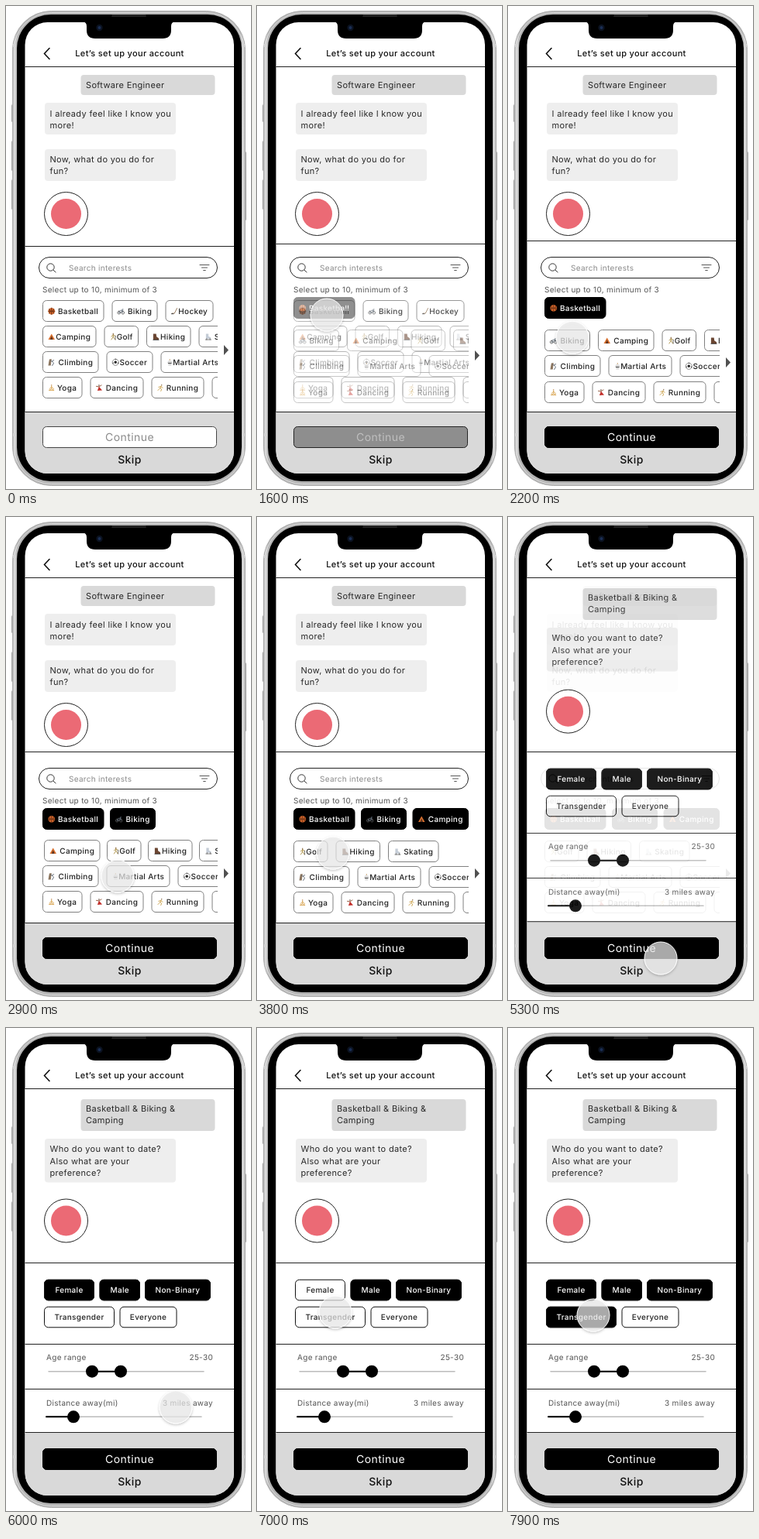
An HTML page that plays this animation: 316x624 px, repeating every 8000 ms.

```html
<!DOCTYPE html>
<html lang="en">
<head>
<meta charset="utf-8">
<title>Account setup</title>
<style>
html, body { margin: 0; width: 100%; height: 100%; overflow: hidden; background: #fff; }
svg { display: block; width: 316px; height: 624px; }
text {
  font-family: Inter, "Open Sans", sans-serif; letter-spacing: .03em;
  white-space: pre; text-rendering: geometricPrecision;
}
</style>
</head>
<body>
<svg id="stage" viewBox="0 0 316 624" xmlns="http://www.w3.org/2000/svg">
  <defs>
    <clipPath id="screen"><rect x="24.5" y="21" width="269.5" height="583" rx="29"/></clipPath>
    <clipPath id="list"><rect x="40" y="372" width="233" height="150"/></clipPath>
    <linearGradient id="metal">
      <stop offset="0" stop-color="#a8a8a8"/><stop offset=".008" stop-color="#dedede"/>
      <stop offset=".02" stop-color="#b4b4b4"/><stop offset=".98" stop-color="#b4b4b4"/>
      <stop offset=".992" stop-color="#dedede"/><stop offset="1" stop-color="#a8a8a8"/>
    </linearGradient>
    <filter id="soft" x="-30%" y="-30%" width="160%" height="160%">
      <feDropShadow dx="0" dy="1.5" stdDeviation="1.8" flood-opacity=".28"/>
    </filter>
  </defs>
  <g id="phone"></g>
  <g clip-path="url(#screen)">
    <rect x="24" y="21" width="270" height="583" fill="#fff"/>
    <g id="chat"></g>
    <g id="search"></g>
    <g id="lists" clip-path="url(#list)"></g>
    <path id="arrow" d="M281 -6.5L287 0L281 6.5Z" fill="#505050"/>
    <g id="dating"></g>
    <path id="divider" d="M24 0H294" stroke="#222"/>
    <g id="avatar"></g>
    <g id="header"></g>
    <g id="footer"></g>
    <g id="cursor"></g>
  </g>
  <g id="notch"></g>
</svg>
<script>
const $ = id => document.getElementById(id);

function el(parent, tag, attrs = {}, content) {
  const node = document.createElementNS('http://www.w3.org/2000/svg', tag);
  for (const key in attrs) node.setAttribute(key, attrs[key]);
  if (content !== undefined) node.textContent = content;
  parent.appendChild(node);
  return node;
}
const group = parent => el(parent, 'g');
const box = (p, x, y, width, height, rx, fill, stroke = 'none') =>
  el(p, 'rect', { x, y, width, height, rx, fill, stroke });
const line = (p, d, stroke = '#222', width = 1) =>
  el(p, 'path', { d, stroke, fill: 'none', 'stroke-width': width, 'stroke-linecap': 'round' });
const dot = (p, cx, cy, r, fill, stroke = 'none') => el(p, 'circle', { cx, cy, r, fill, stroke });
const text = (p, x, y, str, size, fill = '#222', anchor = 'start', weight = 400) =>
  el(p, 'text', { x, y, fill, 'font-size': size, 'text-anchor': anchor, 'font-weight': weight }, str);

// Phone body
const phone = $('phone');
[[7, 127, 23], [7, 174, 39], [7, 224, 39], [306, 188, 89]].forEach(([x, y, h]) =>
  box(phone, x, y, 4, h, 1.5, '#a4a4a4'));
box(phone, 8.5, 6.5, 300, 613, 50, 'url(#metal)', '#b0b0b0');
box(phone, 10.5, 8.5, 296, 609, 48, 'none', '#dcdcdc');
[49, 552].forEach(y => [9, 304].forEach(x => box(phone, x, y, 4, 4, 0, '#d4d4d4')));
box(phone, 14, 11, 290, 603, 44, '#000');

const notch = $('notch');
el(notch, 'path', { d: 'M99 20Q104 21 104 26V31Q104 42 115 42H202Q213 42 213 31V26Q213 21 218 20Z' });
dot(notch, 120.5, 28, 4.2, '#0b1220');
dot(notch, 120.5, 28, 2, '#1b2f55');
box(notch, 136, 11, 45, 3, 1.5, '#222');

// Header and conversation
const header = $('header');
line(header, 'M56 54.5L49.5 61.5L56 68.5', '#111', 1.6);
text(header, 159.5, 65, 'Let’s set up your account', 11, '#111', 'middle', 500);
line(header, 'M24 78.5H294');

function bubble(p, x, y, w, h, fill, first, lines) {
  box(p, x, y, w, h, 4, fill);
  lines.forEach((str, i) => text(p, x + 6.5, first + i * 15.4, str, 11, '#292929'));
}
const chat = $('chat');
bubble(chat, 96.5, 89, 173, 26, '#d9d9d9', 106, ['Software Engineer']);
bubble(chat, 50, 125, 169, 41, '#eee', 142.5, ['I already feel like I know you', 'more!']);
bubble(chat, 50, 185, 169, 41, '#eee', 202, ['Now, what do you do for', 'fun?']);
dot($('avatar'), 77.5, 0, 28, '#fff', '#222');
dot($('avatar'), 77.5, 0, 19.5, '#eb6a75');

// Search field
const search = $('search');
box(search, 42.5, 324.5, 230, 27, 13.5, '#fff', '#222');
dot(search, 57.5, 337.5, 4.7, 'none', '#333');
line(search, 'M61 341L64 344', '#333');
text(search, 81, 342, 'Search interests', 10, '#8a8a8a');
line(search, 'M250 334.5H262M252.5 338H259.5M254.7 341.5H257.3', '#555');
text(search, 47, 369.5, 'Select up to 10, minimum of 3', 10, '#555');

// Pictograms: [path, colour, filled] on a 10 unit square
const figure = 'M5 1.5V5L2.5 9M5 5L7.5 9M2.5 4.5L5 3L8 4';
const icons = {
  Basketball: [['M5 .5A4.5 4.5 0 1 0 5.01 .5Z', '#d9682b', 1], ['M5 .5V9.5M.5 5H9.5M2 2Q4.5 5 2 8M8 2Q5.5 5 8 8', '#5a2a12']],
  Biking: [['M2.3 5A2 2 0 1 0 2.31 5ZM7.7 5A2 2 0 1 0 7.71 5Z', '#555'], ['M2.3 7L4 4H7L5 7H2.3M7.7 7L6.6 2.5H8', '#66707c']],
  Hockey: [['M8.5 1L5 8H2', '#8a6a4a'], ['M1 8.6H3.5', '#222']],
  Camping: [['M5 1L9.5 9H.5Z', '#d9712f', 1], ['M5 4L7 9H3Z', '#5d3420', 1]],
  Golf: [[figure, '#a88b3a'], ['M5 .6V2', '#754c24'], ['M8 4V9', '#555']],
  Hiking: [['M2 1H6L6.5 5L9.5 7V9H2Z', '#6b4632', 1], ['M2 9.3H9.5', '#222']],
  Skating: [['M2.5 1H6V4.5L9 6V7.5H2.5Z', '#c4ccd6', 1], ['M2 9H9.5M3.5 7.5V9M8 7.5V9', '#666']],
  Climbing: [['M.5 9.5L2 1L5 .5L4 9.5Z', '#8c765f', 1], ['M8 2L6 4L8 6L6 9.5M6 4L4 3', '#4a5563']],
  Soccer: [['M5 .7A4.3 4.3 0 1 0 5.01 .7Z', '#777'], ['M5 3L7 4.5L6.2 6.7H3.8L3 4.5ZM4 1H6L5 1.8ZM1 6L2.2 7.5L2 4.8ZM9 6L7.8 7.5L8 4.8Z', '#222', 1]],
  'Martial Arts': [['M3 3H7L8.5 6H7V9.5H3V6H1.5Z', '#d9d9d9', 1], ['M3 6.3H7', '#333'], ['M5 1V2', '#b98a4b']],
  Yoga: [['M5 3V6.5L1.5 8.5H8.5L5 6.5M5 3.8L2 6.5M5 3.8L8 6.5', '#d8a24a'], ['M5 1V2', '#b9772f']],
  Dancing: [['M4.5 3L6 5L9 8.5L2.5 9L4 5Z', '#c22f2a', 1], ['M1 3L4.5 3.5L8 1.5', '#8a4b2c'], ['M4.7 1V2.2', '#4b2a1a']],
  Running: [['M6 2.5L4.5 5.5L6.5 7L5.5 9.5M4.5 5.5L1.5 8.5M2.5 4L5.5 3.2L8 5', '#c79a3e'], ['M6.6 .8V1.6', '#6d4a26']],
  Swimming: [['M1 7Q3 5 5 7T9 7', '#4a8ab5']]
};
const widths = {
  Basketball: 78.5, Biking: 58, Hockey: 61, Camping: 71.5, Golf: 43.5, Hiking: 56.5, Skating: 64.5,
  Climbing: 71.5, Soccer: 59, 'Martial Arts': 81, Yoga: 50.5, Dancing: 68, Running: 67, Swimming: 78
};

function chip(p, x, y, w, name, dark) {
  box(p, x, y, w, 27, 5, dark ? '#000' : '#fff', dark ? '#000' : '#808080');
  const pic = el(p, 'g', { transform: `translate(${x + 6.5} ${y + 9}) scale(.95)` });
  for (const [d, color, solid] of icons[name]) {
    if (solid) el(pic, 'path', { d, fill: color });
    else line(pic, d, color, .9);
  }
  text(p, x + w - 6.8, y + 17.3, name, 10, dark ? '#fff' : '#222', 'end', 500);
}
function row(p, y, names, { x = 47.5, gap = 11, dark = false, tight = 0 } = {}) {
  for (const name of names) {
    const w = widths[name] - (name === 'Camping' ? tight : 0);
    chip(p, x, y, w, name, dark);
    x += w + gap;
  }
}
const bottomRow = ['Yoga', 'Dancing', 'Running', 'Swimming'];
const midRow = ['Climbing', 'Martial Arts', 'Soccer'];
const picked = { gap: 8.5, dark: true };
const lists = $('lists');

const early = group(lists);
row(early, 380.5, ['Biking', 'Hockey'], { x: 137 });
const sets = [0, 1, 2, 3].map(() => group(lists));
row(sets[0], 380.5, ['Basketball']);
row(sets[0], 413.5, ['Camping', 'Golf', 'Hiking', 'Skating'], { tight: 3 });
row(sets[0], 446.5, ['Climbing', 'Soccer', 'Martial Arts']);
row(sets[0], 479.5, bottomRow);

row(sets[1], 376.5, ['Basketball'], picked);
row(sets[1], 418.5, ['Biking', 'Camping', 'Golf', 'Hiking']);
row(sets[1], 451.5, midRow);
row(sets[1], 485.5, bottomRow);

row(sets[2], 376.5, ['Basketball', 'Biking'], picked);
row(sets[2], 417.5, ['Camping', 'Golf', 'Hiking', 'Skating'], { x: 49.5, gap: 9.5 });
row(sets[2], 450.5, midRow);
row(sets[2], 483.5, bottomRow);

row(sets[3], 376.5, ['Basketball', 'Biking', 'Camping'], picked);
row(sets[3], 418.5, ['Golf', 'Hiking', 'Skating']);
row(sets[3], 451.5, midRow);
row(sets[3], 484.5, bottomRow);

// Preference screen
const dating = $('dating');
box(dating, 24, 79, 270, 445, 0, '#fff');
bubble(dating, 96.5, 92, 173, 41, '#d9d9d9', 108, ['Basketball & Biking &', 'Camping']);
bubble(dating, 50, 143, 169, 56.5, '#eee', 160.3, ['Who do you want to date?', 'Also what are your', 'preference?']);

function option(x, y, w, label) {
  const face = (p, fill, ink) => {
    box(p, x, y, w, 26.5, 5, fill, '#111');
    text(p, x + w / 2, y + 16.7, label, 10, ink, 'middle', 500);
  };
  face(dating, '#fff', '#222');
  const on = group(dating);
  face(on, '#000', '#fff');
  return on;
}
const female = option(49.5, 325.3, 64, 'Female');
option(121, 325.3, 51.5, 'Male');
option(179.5, 325.3, 84, 'Non-Binary');
const trans = option(49.5, 360.3, 90, 'Transgender');
option(147, 360.3, 73, 'Everyone').setAttribute('opacity', 0);

line(dating, 'M24 408.5H294M24 466.5H294');
function slider(y, x, from, to, knobs, label, value, end) {
  text(dating, 52, y - 14.3, label, 10, '#555');
  text(dating, end, y - 14.3, value, 10, '#555', 'end');
  line(dating, `M${x} ${y}H${x + 200}`, '#bbb', 1.5);
  line(dating, `M${from} ${y}H${to}`, '#000', 2);
  knobs.forEach(k => dot(dating, k, y, 8, '#000'));
}
slider(443.7, 55, 111, 148, [111, 148], 'Age range', '25-30', 267);
slider(502.3, 52, 52, 87, [87], 'Distance away(mi)', '3 miles away', 267);

// Footer
const footer = $('footer');
const tray = group(footer);
box(tray, 24, 0, 270, 90, 0, '#d9d9d9');
line(tray, 'M24 0H294');
box(footer, 47.5, 543.5, 224, 27, 5, '#fff', '#444');
text(footer, 159.5, 562, 'Continue', 14, '#8c8c8c', 'middle');
const ready = group(footer);
box(ready, 47.5, 543.5, 224, 27, 5, '#000', '#000');
text(ready, 159.5, 562, 'Continue', 14, '#fff', 'middle');
text(footer, 159.5, 591, 'Skip', 14, '#111', 'middle', 500);

const cursor = $('cursor');
cursor.setAttribute('filter', 'url(#soft)');
dot(cursor, 0, 0, 21, 'rgba(238,238,238,.68)', '#fff');

// Motion
const LOOP = 8000;
const path = [
  [100, 232, 557], [850, 78, 402], [1600, 90, 399], [1900, 89, 402], [2300, 82, 433], [2600, 92, 437],
  [2900, 144, 464], [3200, 95, 434], [3800, 98, 434], [4400, 187, 538], [4700, 196, 566],
  [5300, 197, 570], [5600, 199, 571], [5850, 245, 520], [6400, 104, 357], [6600, 101, 366],
  [7000, 101, 367], [7200, 101, 365], [7400, 102, 366], [7700, 109, 371], [7900, 110, 371]
];
const smooth = u => u * u * (3 - 2 * u);
function along(t) {
  const i = path.findIndex(k => k[0] > t);
  if (i === 0) return path[0].slice(1);
  if (i < 0) return path[path.length - 1].slice(1);
  const a = path[i - 1], b = path[i];
  const u = smooth((t - a[0]) / (b[0] - a[0]));
  return [a[1] + (b[1] - a[1]) * u, a[2] + (b[2] - a[2]) * u];
}
// Ease-out progress between two times
const ramp = (t, from, to) => 1 - (1 - Math.min(1, Math.max(0, (t - from) / (to - from)))) ** 2;
const fade = (node, v) => node.setAttribute('opacity', v.toFixed(3));
const drop = (node, y) => node.setAttribute('transform', `translate(0 ${y.toFixed(2)})`);

function draw(t) {
  const first = ramp(t, 1500, 1900), second = ramp(t, 2300, 2700);
  const third = ramp(t, 3200, 3550), next = ramp(t, 4800, 5550);
  fade(early, 1 - first * first);
  fade(sets[0], 1 - first);
  fade(sets[1], first * (1 - second));
  fade(sets[2], second * (1 - third));
  fade(sets[3], third);
  fade(ready, first);
  fade(dating, next);
  fade(female, 1 - ramp(t, 6500, 6850) + ramp(t, 7400, 7700));
  fade(trans, ramp(t, 7500, 7850));
  drop($('arrow'), 444.5 + 16 * first);
  drop($('divider'), 310.5 - 7 * first);
  drop($('avatar'), 268.5 - 19.5 * next);
  drop(tray, 524.5 - 2 * next);
  const [x, y] = along(t);
  cursor.setAttribute('transform', `translate(${x.toFixed(2)} ${y.toFixed(2)})`);
  cursor.setAttribute('visibility', t < 100 ? 'hidden' : 'visible');
}
const start = performance.now();
function tick() {
  draw((performance.now() - start) % LOOP);
  requestAnimationFrame(tick);
}
draw(0);
requestAnimationFrame(tick);
</script>
</body>
</html>
```
